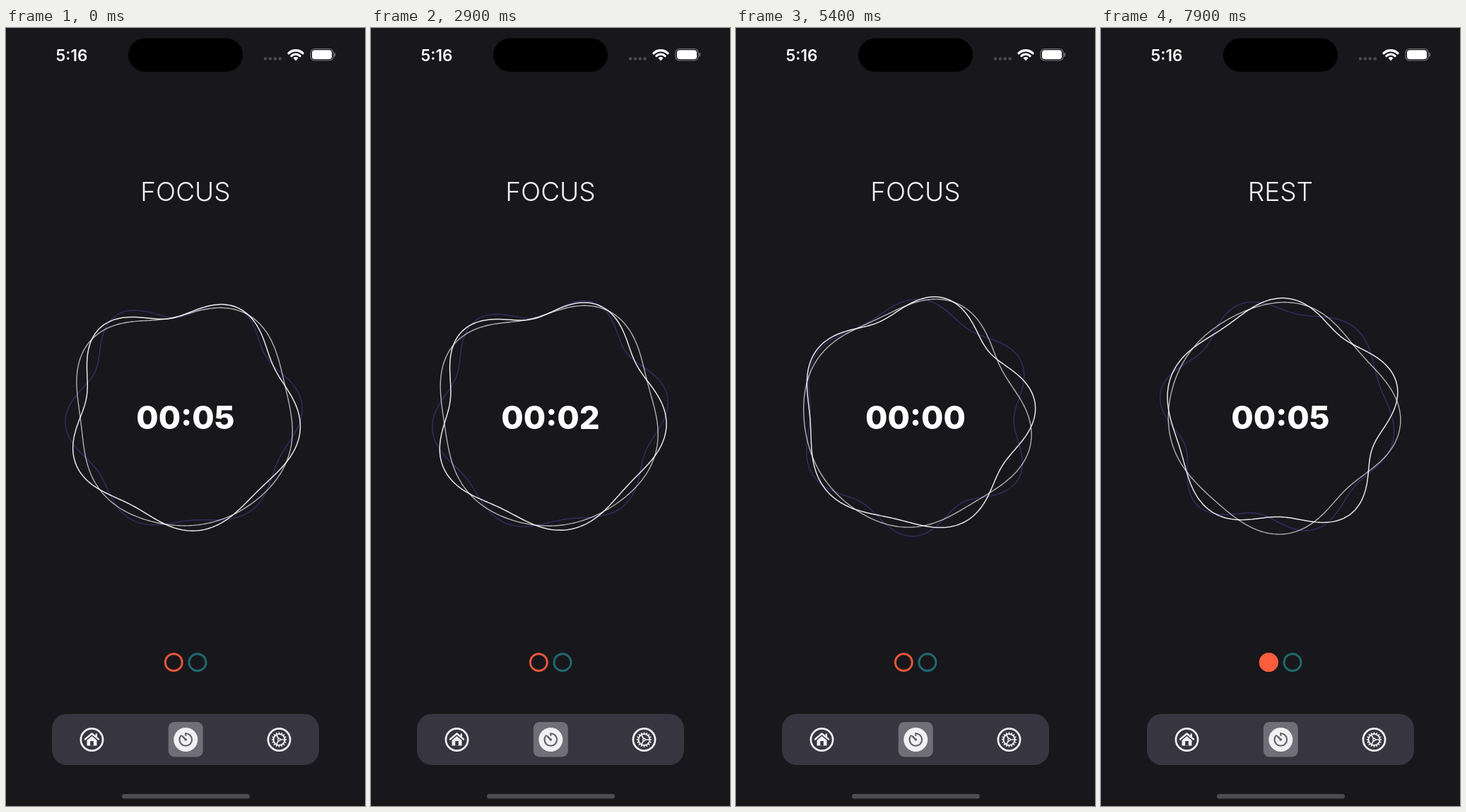
Recreate the animation shown at these times as an HTML page with a canvas. Size 508 px wide and 1102 px high, loop 8 s.

```html
<!DOCTYPE html>
<html lang="en">
<head>
<meta charset="utf-8">
<title>Focus timer</title>
<style>
  html, body { margin: 0; width: 100%; height: 100%; overflow: hidden; background: #18171b; }
  canvas { display: block; width: 508px; height: 1102px; }
</style>
</head>
<body>
<canvas id="stage"></canvas>
<script>
const W = 508, H = 1102, LOOP = 8000, STEP = 100;
const TICK = 850, REST_AT = TICK + 5000, FADE = 550;
const TAU = Math.PI * 2, DEG = Math.PI / 180;
const BG = '#18171b', BAR = '#37353f', ACTIVE = '#706e76', LIGHT = '#f1f0f3';

const canvas = document.getElementById('stage');
const ctx = canvas.getContext('2d');
const dpr = window.devicePixelRatio || 1;
canvas.width = W * dpr;
canvas.height = H * dpr;
ctx.scale(dpr, dpr);

// Lobes drift clockwise while the swell of their height runs the other way.
const rings = [
  { lobes: 6, amp: 12, swell: 0.35, lag: 154, lead: 16, speed: 2, color: '#322c60', width: 1.5 },
  { lobes: 4, amp: 8.3, swell: 0.95, lag: 142, lead: 16, speed: 1, color: 'rgba(255,255,255,0.66)', width: 1.4 },
  { lobes: 5, amp: 12, swell: 0.4, lag: 139, lead: 28, speed: 1, color: 'rgba(255,255,255,0.9)', width: 1.5 }
];

function box(x, y, w, h, r, color) {
  ctx.beginPath();
  ctx.roundRect(x, y, w, h, r);
  ctx.fillStyle = color;
  ctx.fill();
}

function disc(x, y, r, color) {
  ctx.beginPath();
  ctx.arc(x, y, r, 0, TAU);
  ctx.fillStyle = color;
  ctx.fill();
}

function arc(x, y, r, color, width, from = 0, to = 360) {
  ctx.beginPath();
  ctx.arc(x, y, r, from * DEG, to * DEG);
  ctx.strokeStyle = color;
  ctx.lineWidth = width;
  ctx.stroke();
}

function line(color, width, ...pts) {
  ctx.beginPath();
  for (let i = 0; i < pts.length; i += 2) ctx.lineTo(pts[i], pts[i + 1]);
  ctx.strokeStyle = color;
  ctx.lineWidth = width;
  ctx.stroke();
}

function text(str, x, y, size, weight, alpha = 1) {
  ctx.globalAlpha = alpha;
  ctx.font = `${weight} ${size}px Inter, sans-serif`;
  ctx.textAlign = 'center';
  ctx.fillStyle = '#fff';
  ctx.fillText(str, x, y);
  ctx.globalAlpha = 1;
}

function ring(p, t) {
  const turn = p.speed * t / 3000 * TAU;
  ctx.beginPath();
  for (let a = 0; a < 360; a++) {
    const q = a * DEG;
    const height = p.amp * (1 + p.swell * Math.cos(q + turn + p.lead * DEG));
    const r = 156 + height * Math.cos(p.lobes * q - turn - p.lag * DEG);
    ctx.lineTo(252.5 + r * Math.sin(q), 549.5 - r * Math.cos(q));
  }
  ctx.closePath();
  ctx.strokeStyle = p.color;
  ctx.lineWidth = p.width;
  ctx.stroke();
}

function statusBar() {
  text('5:16', 93, 46.5, 22.5, 600);
  box(173, 14.5, 162, 47.5, 23.75, '#000');
  for (let i = 0; i < 4; i++) disc(367 + i * 6.9, 43.5, 2.3, '#4b4a50');
  arc(410, 46, 14.3, '#fff', 3.4, -134, -46);
  arc(410, 46, 8.8, '#fff', 3.2, -134, -46);
  ctx.beginPath();
  ctx.moveTo(410, 46.5);
  ctx.arc(410, 46, 5, -134 * DEG, -46 * DEG);
  ctx.fillStyle = '#fff';
  ctx.fill();
  ctx.beginPath();
  ctx.roundRect(431, 29.5, 32, 16.5, 5.5);
  ctx.strokeStyle = '#77767b';
  ctx.lineWidth = 1.2;
  ctx.stroke();
  box(433, 31.3, 28, 13, 3.8, '#fff');
  box(464.3, 35, 1.8, 5.5, 1, '#77767b');
}

function homeIcon(x, y) {
  arc(x, y, 15.6, LIGHT, 2.7);
  ctx.lineJoin = ctx.lineCap = 'round';
  line(LIGHT, 2.4, x - 9.5, y - 0.5, x, y - 8.5, x + 9.5, y - 0.5);
  line(LIGHT, 2.4, x + 6.3, y - 7.5, x + 6.3, y - 4);
  ctx.beginPath();
  ctx.moveTo(x, y - 5);
  ctx.lineTo(x + 7, y + 1);
  ctx.lineTo(x + 7, y + 8.5);
  ctx.lineTo(x - 7, y + 8.5);
  ctx.lineTo(x - 7, y + 1);
  ctx.fillStyle = LIGHT;
  ctx.fill();
  box(x - 2.3, y + 2, 4.6, 6.5, 0.5, BAR);
}

function timerIcon(x, y) {
  box(x - 24.5, y - 25, 49, 49.5, 8.5, ACTIVE);
  disc(x, y, 17, LIGHT);
  arc(x, y, 8.8, '#626068', 2.1, -90, 222);
  line('#626068', 2.1, x, y - 8.8, x, y - 6);
  line('#626068', 2.4, x - 4.6, y - 4.8, x, y);
  disc(x, y, 1.8, '#626068');
}

function gearIcon(x, y) {
  arc(x, y, 15.6, LIGHT, 2.7);
  arc(x, y, 8, LIGHT, 2);
  for (let i = 0; i < 16; i++) {
    const c = Math.cos(i * TAU / 16), s = Math.sin(i * TAU / 16);
    line(LIGHT, 1.7, x + 8.5 * c, y + 8.5 * s, x + 10 * c, y + 10 * s);
  }
  for (const a of [0, 120, 240]) {
    line(LIGHT, 1.7, x, y, x + 8 * Math.cos(a * DEG), y + 8 * Math.sin(a * DEG));
  }
  disc(x, y, 2.4, LIGHT);
  disc(x, y, 0.9, BAR);
}

function tabBar() {
  box(65, 971.5, 378, 72.5, 21, BAR);
  homeIcon(121.5, 1008);
  timerIcon(254.3, 1008);
  gearIcon(386.5, 1008);
  box(164, 1085, 181, 6.5, 3.25, '#4d4c51');
}

function clock(t) {
  const left = t < REST_AT
    ? 5 - Math.max(0, Math.floor((t - TICK) / 1000) + 1)
    : 7 - Math.floor((t - REST_AT) / 1000);
  return '00:0' + left;
}

function draw(t) {
  ctx.fillStyle = BG;
  ctx.fillRect(0, 0, W, H);
  statusBar();

  const k = Math.min(1, Math.max(0, (t - REST_AT) / FADE));
  const mix = k * k * (3 - 2 * k);
  if (mix < 1) text('FOCUS', 254, 245, 37, 300, 0.95 * (1 - mix));
  if (mix > 0) text('REST', 254, 245, 37, 300, 0.95 * mix);

  for (const p of rings) ring(p, t);
  text(clock(t), 254, 567.5, 45.5, 800);

  arc(237.3, 898.5, 12, '#e4573b', 2.9);
  if (t >= REST_AT) disc(237.3, 898.5, 13.5, '#fb5d3d');
  arc(271, 898.5, 12, '#1d6a70', 2.9);
  tabBar();
}

function frame(now) {
  draw(Math.floor((now % LOOP) / STEP) * STEP);
  requestAnimationFrame(frame);
}
draw(0);
requestAnimationFrame(frame);
</script>
</body>
</html>
```
